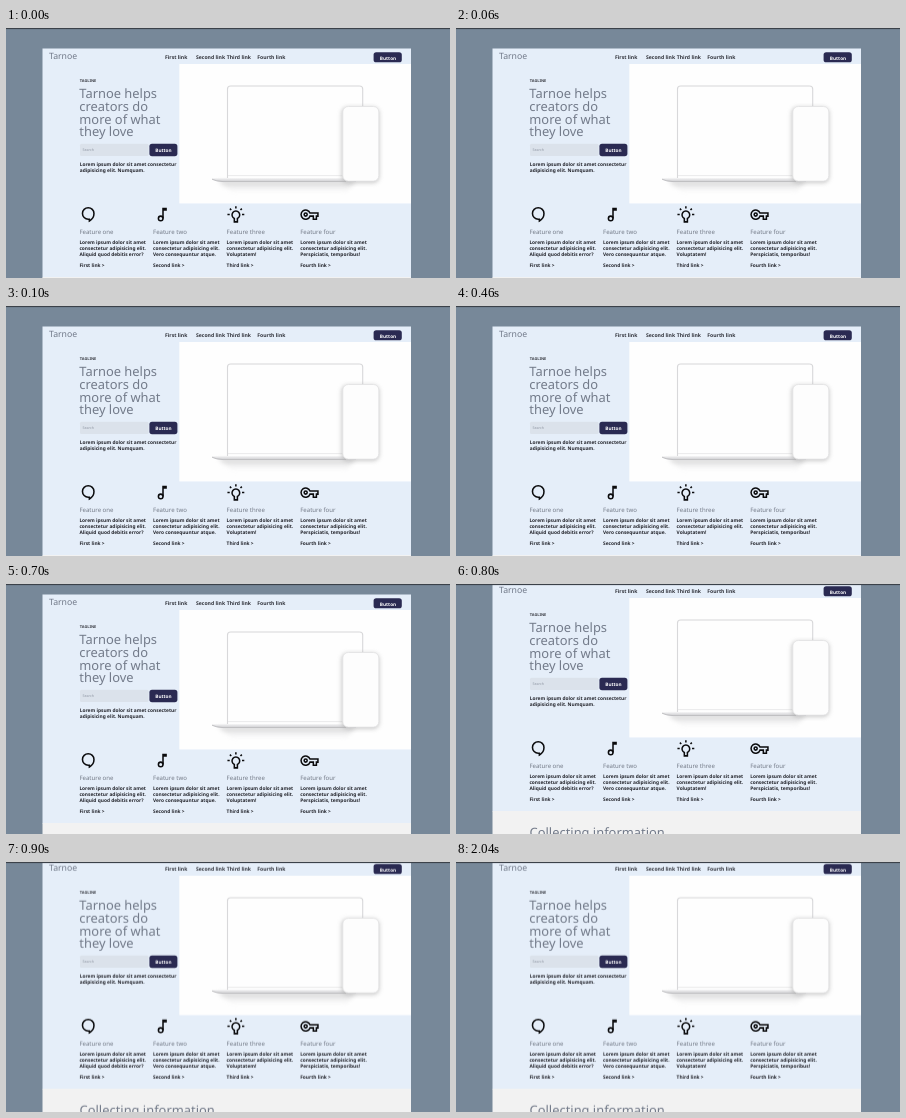
Write an HTML page that moves like this. It is 444 px wide and 250 px high and loops after 2.8 s.

```html
<!DOCTYPE html>
<html lang="en">
<head>
<meta charset="utf-8">
<title>Landing page scroll</title>
<style>
  html, body { margin: 0; width: 100%; height: 100%; overflow: hidden; background: #778899; }
  svg { display: block; width: 100%; height: 100%; }
  text { font-family: "Noto Sans", "Open Sans", sans-serif; font-size: 4.83px; font-weight: 600; fill: #23242b; text-rendering: geometricPrecision; }
  .logo { font-size: 8.7px; font-weight: 400; fill: #707888; }
  .head { font-size: 12.9px; font-weight: 400; fill: #737b8a; }
  .name { font-size: 6.05px; font-weight: 400; fill: #747b88; }
  .tag { font-size: 3.9px; fill: #3c3e46; }
  .nav { font-size: 5.1px; fill: #30323a; }
  .hint { font-size: 3.6px; font-weight: 400; fill: #8f97a3; }
  .btn { font-size: 4.7px; font-weight: 700; fill: #fff; text-anchor: middle; }
  .icon { fill: none; stroke: #0b0b0d; stroke-width: 2; }
</style>
</head>
<body>
<svg viewBox="0 0 444 250" preserveAspectRatio="none">
  <defs>
    <linearGradient id="shade" x2="0" y2="1">
      <stop offset="0" stop-color="#b4b4b6"/>
      <stop offset="1" stop-color="#fff" stop-opacity="0"/>
    </linearGradient>
    <linearGradient id="deck" x2="0" y2="1">
      <stop offset="0" stop-color="#f1f1f2"/>
      <stop offset="1" stop-color="#cdcdd0"/>
    </linearGradient>
    <filter id="soft" x="-30%" y="-30%" width="160%" height="160%">
      <feGaussianBlur stdDeviation="2"/>
    </filter>
  </defs>
  <rect width="444" height="250" fill="#778899"/>
  <g id="page">
    <rect x="36.5" y="20.5" width="368.5" height="229" fill="#e5eef9"/>
    <rect x="36.5" y="249" width="368.5" height="40" fill="#f2f2f2"/>
    <rect x="173.3" y="36" width="231.7" height="139.4" fill="#fefefe"/>

    <!-- laptop -->
    <path d="M212 153H350L338 167H230Z" fill="url(#shade)" opacity=".65" filter="url(#soft)"/>
    <path d="M221.5 150V61Q221.5 58 224.5 58H353.7Q356.7 58 356.7 61V150" fill="#fefefe" stroke="#d8d8da" stroke-width="1.1"/>
    <path d="M222 147.6H340" stroke="#e2e2e4" stroke-width=".7"/>
    <path d="M206 150.2H350V153.8H216Q209 153.2 206 151.4Z" fill="url(#deck)"/>
    <path d="M206 151.2Q210 153.2 217 153.6H340" fill="none" stroke="#b4b4b7" stroke-width=".7"/>

    <!-- phone -->
    <rect x="335.4" y="79" width="38" height="76" rx="6" fill="#aaa" opacity=".6" filter="url(#soft)"/>
    <rect x="336.8" y="78.5" width="36" height="74.6" rx="5.5" fill="#fdfdfd" stroke="#e2e2e4" stroke-width=".8"/>

    <rect x="74" y="115.8" width="68.5" height="12.2" rx="1.5" fill="#dbe2eb"/>
    <rect x="143.4" y="115.8" width="28" height="12.4" rx="2.6" fill="#2a2a52"/>
    <rect x="367.6" y="24.2" width="28.2" height="10.1" rx="2.6" fill="#2a2a52"/>

    <!-- feature icons on a 24-unit grid -->
    <g class="icon" transform="translate(73.4 177.4) scale(.767)">
      <path d="M13 20.3V18H11.5A7.5 7.5 0 1 1 19 10.5C19 14.5 16.5 18.3 13 20.3Z"/>
      <g transform="translate(96)">
        <path d="M13 17V4H17V6H13"/>
        <circle cx="10" cy="17" r="3"/>
      </g>
      <g transform="translate(192)">
        <path d="M10 21.5V17A5 5 0 1 1 14 17V21.5Z"/>
        <path d="M12 1V4M1 12H4M20 12H23M4.2 4.2L6 6M19.8 4.2L18 6"/>
      </g>
      <g transform="translate(288)">
        <path d="M12.65 10H23V14H21V18H17V14H12.65A6 6 0 1 1 12.65 10Z"/>
        <circle cx="7" cy="12" r="2"/>
      </g>
    </g>
  </g>
  <rect width="444" height="1.1" fill="#3b4149"/>
</svg>
<script>
const page = document.getElementById('page');

function put(str, x, y, cls = '') {
  const t = document.createElementNS('http://www.w3.org/2000/svg', 'text');
  t.setAttribute('x', x);
  t.setAttribute('y', y);
  t.setAttribute('class', cls);
  t.textContent = str;
  page.append(t);
}
const lines = (list, x, y, step, cls) => list.forEach((s, i) => put(s, x, y + i * step, cls));

put('Tarnoe', 43, 31.4, 'logo');
[['First', 159], ['Second', 190], ['Third', 220.8], ['Fourth', 251.3]]
  .forEach(([word, x]) => put(word + ' link', x, 30.9, 'nav'));
put('Button', 382, 31.5, 'btn');

put('TAGLINE', 73.8, 54.1, 'tag');
lines(['Tarnoe helps', 'creators do', 'more of what', 'they love'], 73.3, 70.4, 12.6, 'head');
put('Search', 76.5, 123.2, 'hint');
put('Button', 157.4, 123.8, 'btn');
const lorem = 'Lorem ipsum dolor sit amet';
lines([lorem + ' consectetur', 'adipisicing elit. Numquam.'], 73.8, 137.9, 6.2);

[
  ['one', 'First', 'Aliquid quod debitis error?'],
  ['two', 'Second', 'Vero consequuntur atque.'],
  ['three', 'Third', 'Voluptatem!'],
  ['four', 'Fourth', 'Perspiciatis, temporibus!']
].forEach(([num, nth, end], i) => {
  const x = 73.4 + i * 73.6;
  put('Feature ' + num, x, 206.3, 'name');
  lines([lorem, 'consectetur adipisicing elit.', end], x, 216, 6.2);
  put(nth + ' link >', x, 238.9);
});
put('Collecting information', 73.6, 274.6, 'head');

// [time in ms, scroll offset]; each offset holds until the next
const LOOP = 2800;
const scroll = [[0, 0], [700, 10], [800, 22], [900, 22.3], [LOOP, 22.3]];
page.animate(
  scroll.map(([ms, y]) => ({ offset: ms / LOOP, transform: `translateY(${-y}px)`, easing: 'step-end' })),
  { duration: LOOP, iterations: Infinity }
);
</script>
</body>
</html>
```
